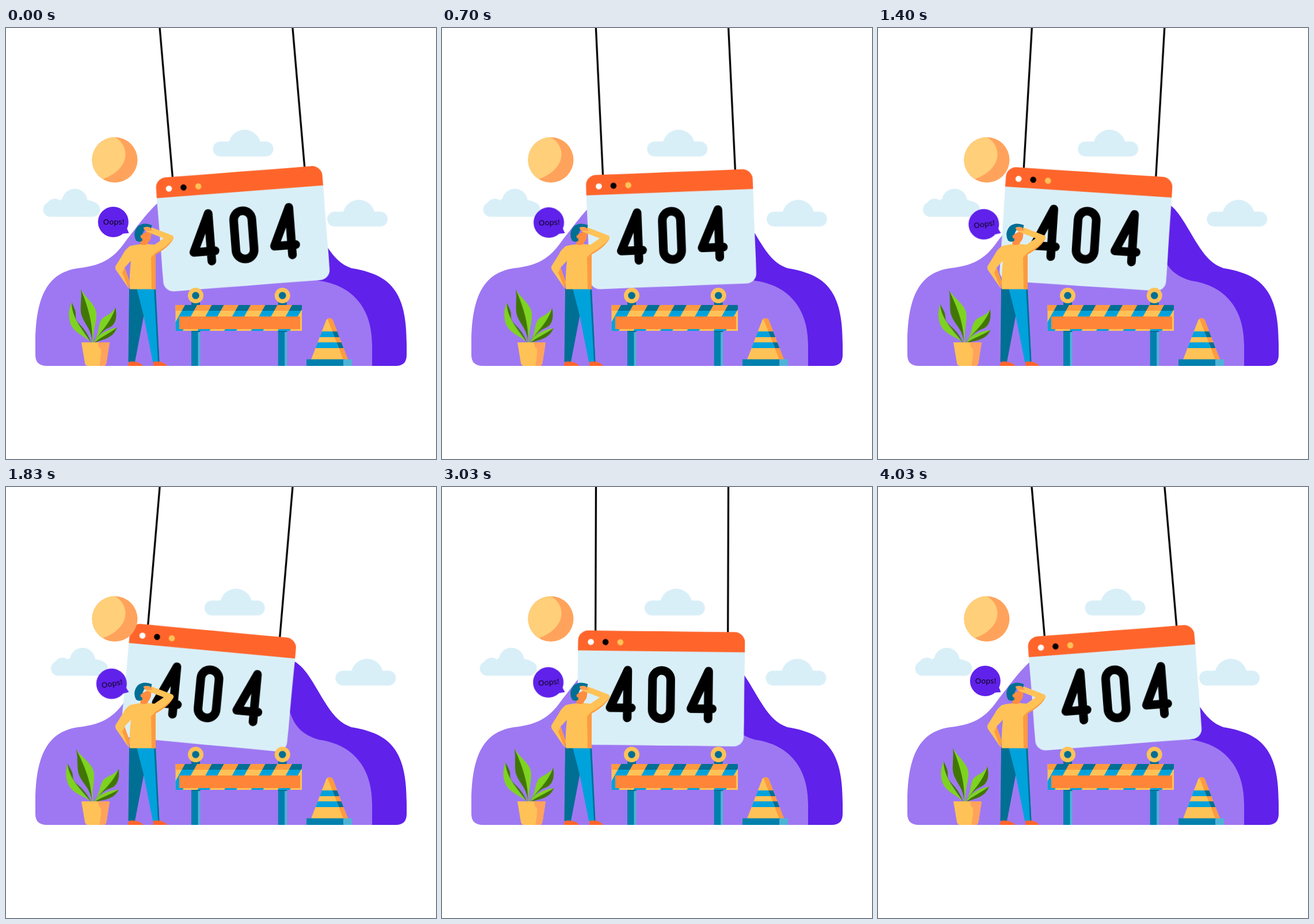
Write an HTML page without scripts that moves like this. It is 747 px wide and 750 px high and loops after 4.06 s.

```html
<!DOCTYPE html>
<html lang="en">
<head>
<meta charset="utf-8">
<title>404</title>
<style>
  html, body { margin: 0; width: 100%; height: 100%; overflow: hidden; background: #fff; }
  svg { display: block; width: 100vw; height: 100vh; }

  .yellow { fill: #ffc257; }
  .orange { fill: #ff9a3f; }
  .red { fill: #ff652b; }
  .teal { fill: #006f94; }
  .mid { fill: #0080ad; }
  .blue { fill: #00a2dc; }
  .sky { fill: #4fb3d6; }
  .pale { fill: #d9eff8; }
  .violet { fill: #6021ea; }
  .lilac { fill: #9e78f2; }
  .leaf { fill: #7ed321; }
  .shade { fill: #417505; }

  .swing, .drift {
    animation: turn 2030ms cubic-bezier(.5, 0, .5, 1) infinite alternate;
  }
  .swing { transform-origin: var(--at); }
  .drift { animation-name: drift; }
  .sign { --at: 382.5px 0px; --from: -4.9deg; --to: 5deg; }
  .bubble { --at: 213px 357px; --to: -10deg; }
  .plant { --at: 150px 549px; }
  .west, .east { animation: west 4060ms cubic-bezier(.2, 0, .8, 1) infinite; }
  .east { animation-name: east; }

  @keyframes turn {
    from { transform: rotate(var(--from, 0deg)); }
    to { transform: rotate(var(--to)); }
  }
  @keyframes drift { to { transform: translateX(-15px); } }
  @keyframes west {
    0%, 79%, 100% { transform: none; }
    33.3%, 49.3% { transform: translateX(13.5px); }
  }
  @keyframes east {
    0%, 86.5%, 100% { transform: none; }
    40%, 52% { transform: translateX(14.3px); }
  }
</style>
</head>
<body>
<svg viewBox="0 0 747 750">
  <defs>
    <g id="cloud" class="pale">
      <rect y="22" width="105" height="26" rx="13"/>
      <path d="M24 36V25Q28 25 28 22A28 28 0 0 1 82 22Q83 25 87 25V36Z"/>
    </g>
    <path id="four" d="M0 402.5V319.5L-30 385H7"/>
    <path id="stripe" d="M311 482H332L307 527H286Z"/>
    <g id="stripes">
      <use href="#stripe"/>
      <use href="#stripe" x="46.5"/>
      <use href="#stripe" x="93"/>
      <use href="#stripe" x="139.5"/>
      <use href="#stripe" x="186"/>
    </g>
    <g id="post">
      <rect class="teal" x="322" y="477" width="15" height="6"/>
      <circle class="yellow" cx="329.5" cy="465.5" r="13.5"/>
      <circle class="teal" cx="329.5" cy="465.5" r="6.3"/>
      <rect class="mid" x="322" y="526" width="12" height="62"/>
      <rect class="sky" x="333.5" y="526" width="4" height="62"/>
      <rect class="teal" x="322" y="526" width="15.5" height="3"/>
    </g>
    <clipPath id="plank"><rect x="294.5" y="482" width="219.5" height="45"/></clipPath>
    <clipPath id="plankTop"><rect x="294.5" y="482" width="219.5" height="10"/></clipPath>
    <clipPath id="panel"><rect x="-146" y="251" width="290" height="199" rx="18"/></clipPath>
    <clipPath id="cone"><path d="M530 577L556 509Q558 505 562 505T568 509L594 577Z"/></clipPath>
  </defs>

  <!-- clouds -->
  <g class="drift"><use href="#cloud" x="359.5" y="175.5"/></g>
  <g class="east"><use href="#cloud" x="558" y="297.5"/></g>
  <g class="west pale">
    <rect x="64.5" y="303" width="99" height="25.5" rx="12.7"/>
    <circle cx="85" cy="312.5" r="15.5"/>
    <path d="M95 315V299L98 297A22 22 0 0 1 141 297Q141 300 147 300.5Q157 302 160 312L140 320Z"/>
  </g>

  <!-- hills -->
  <path class="violet" d="M300 588V330L490 297L500 303C522 314 537 348 555 376C568 397 580 411 600 418C668 429 696 458 696 550V569Q696 588 677 588Z"/>
  <path class="lilac" d="M71 588Q51 588 51 569V550C51 455 80 425 125 418C172 413 190 397 210 368C228 346 242 324 265 303L470 330L493 391C502 418 516 432 545 440C590 446 636 476 636 552V588Z"/>

  <!-- hanging sign -->
  <g class="swing sign">
    <g transform="translate(382.5)">
      <path d="M-115-15V254M115-15V256" stroke="#000" stroke-width="3.3"/>
      <g transform="rotate(.5 -1 350)">
        <g clip-path="url(#panel)">
          <rect class="pale" x="-146" y="251" width="290" height="199"/>
          <rect class="red" x="-146" y="251" width="290" height="35"/>
        </g>
        <circle cx="-123.7" cy="271" r="5.3" fill="#fff"/>
        <circle cx="-98.2" cy="271" r="5.3"/>
        <circle class="yellow" cx="-72.5" cy="271" r="5.3"/>
        <g fill="none" stroke="#000" stroke-width="15" stroke-linecap="round" stroke-linejoin="round">
          <use href="#four" x="-59"/>
          <rect x="-15.8" y="319.3" width="31.6" height="84" rx="15.8"/>
          <use href="#four" x="81.5"/>
        </g>
      </g>
    </g>
  </g>

  <!-- sun -->
  <circle cx="189" cy="229.5" r="39.5" fill="#ffa35c"/>
  <path d="M189 190C216 205 217 245 168 263A39.5 39.5 0 0 1 189 190Z" fill="#ffcf7a"/>

  <!-- speech bubble -->
  <g class="swing bubble">
    <circle class="violet" cx="186.3" cy="337.5" r="26.5"/>
    <path class="violet" d="M200 358L213.5 357L209 346Z"/>
    <text x="187" y="342" font-family="'Open Sans', 'Noto Sans', sans-serif" font-size="13.3" text-anchor="middle">Oops!</text>
  </g>

  <!-- plant -->
  <g class="swing plant" style="--to:7deg">
    <path class="leaf" d="M153 548C160 534 172 526 193 521Q183 530 176 536Q166 541 153 548Z"/>
    <path class="shade" d="M153 548C164 538 179 532 193 521C186 540 171 541 153 548Z"/>
  </g>
  <g class="swing plant" style="--to:5.5deg">
    <path class="leaf" d="M151 548C163 532 159 521 164 511C168 500 184 500 190 486C190 508 173 522 151 548Z"/>
    <path class="shade" d="M151 548C164 529 184 510 190 486C194 505 190 517 178 522C167 527 160 536 151 548Z"/>
  </g>
  <g class="swing plant" style="--to:-6deg">
    <path class="leaf" d="M148 548C138 535 113 531 110 506C108 494 111 487 114 477C115 504 130 522 148 548Z"/>
    <path class="shade" d="M148 548C133 524 114 505 114 477C118 487 122 491 121 502C121 515 138 518 148 548Z"/>
  </g>
  <g class="swing plant" style="--to:-5deg">
    <path class="leaf" d="M149 549C149 510 139 480 130 454C138 470 155 480 157 496C158 513 151 523 151 549Z"/>
    <path class="shade" d="M150 549C149 521 133 514 130 494C129 480 132 468 130 454C141 483 151 509 150 549Z"/>
  </g>
  <path class="yellow" d="M131 547H180L174.5 583Q173.5 588 169 588H143Q138 588 137 583Z"/>
  <path fill="#ffa35c" d="M160 547H180L174.5 583Q173.5 588 169 588H162Q166 570 165 558Q160 557 160 547Z"/>

  <!-- barrier -->
  <use href="#post"/>
  <use href="#post" x="150.7"/>
  <g clip-path="url(#plank)">
    <rect class="yellow" x="294" y="482" width="220" height="45"/>
    <use href="#stripes" class="blue"/>
  </g>
  <g clip-path="url(#plankTop)">
    <rect class="orange" x="294" y="482" width="220" height="10"/>
    <use href="#stripes" class="teal"/>
  </g>
  <rect x="301" y="502" width="210" height="22" fill="#ff8638"/>

  <!-- cone -->
  <g clip-path="url(#cone)">
    <path class="yellow" d="M520 500H605V577H520Z"/>
    <path class="blue" d="M520 528H605V538H520ZM520 547H605V557H520Z"/>
    <path class="orange" d="M556 500H605V577H586Z"/>
    <path class="teal" d="M567 528H605V538H571ZM574.5 547H605V557H578.5Z"/>
  </g>
  <rect class="mid" x="522" y="576.5" width="66" height="11.5"/>
  <rect class="sky" x="586" y="576.5" width="15" height="11.5"/>

  <!-- man -->
  <path class="teal" d="M214 453H241L241 492L224 581H212.5Z"/>
  <path class="blue" d="M227 453H260L266.5 581H255L239 500Z"/>
  <path class="teal" d="M257 453H260L266.5 581H264Z"/>
  <path class="red" d="M212 588Q211 581 218 580Q234 581 238 588ZM256 588V581Q272 578 280 588Z"/>
  <path fill="#ff8d40" d="M234 360L252 351Q254 367 247 373L245 379Q238 381 233 377L235 366Z"/>
  <path class="yellow" d="M216 379Q207 385 203 394L190.5 414Q189 417 191 421L213 453L215 442L206 417L218 404Z"/>
  <path class="orange" d="M206 417L215 442L213 453L202 426Z"/>
  <path class="yellow" d="M214 380Q222 377 233 376.500Q240 379 246 376L258 377L274 366L243 354L240 347Q248 344 258 349L289 361Q293 364 290 368Q281 382 260 394V454.500H215Q214 430 217 405Z"/>
  <path class="orange" d="M252 399L260 391Q278 382 291 366Q284 381 260 394V454.500H253Z"/>
  <path class="teal" d="M253.500 343Q239 337 229 345Q219 357 226 370Q232 374 237 370L236 361L240 352L252 349Z"/>
  <path fill="#ff9c50" d="M239 347Q245 345 250 347L255 353L243 353Q239 351 239 347Z"/>
  <circle cx="237" cy="363" r="3.300" fill="#ff8d40"/>
</svg>
</body>
</html>
```
